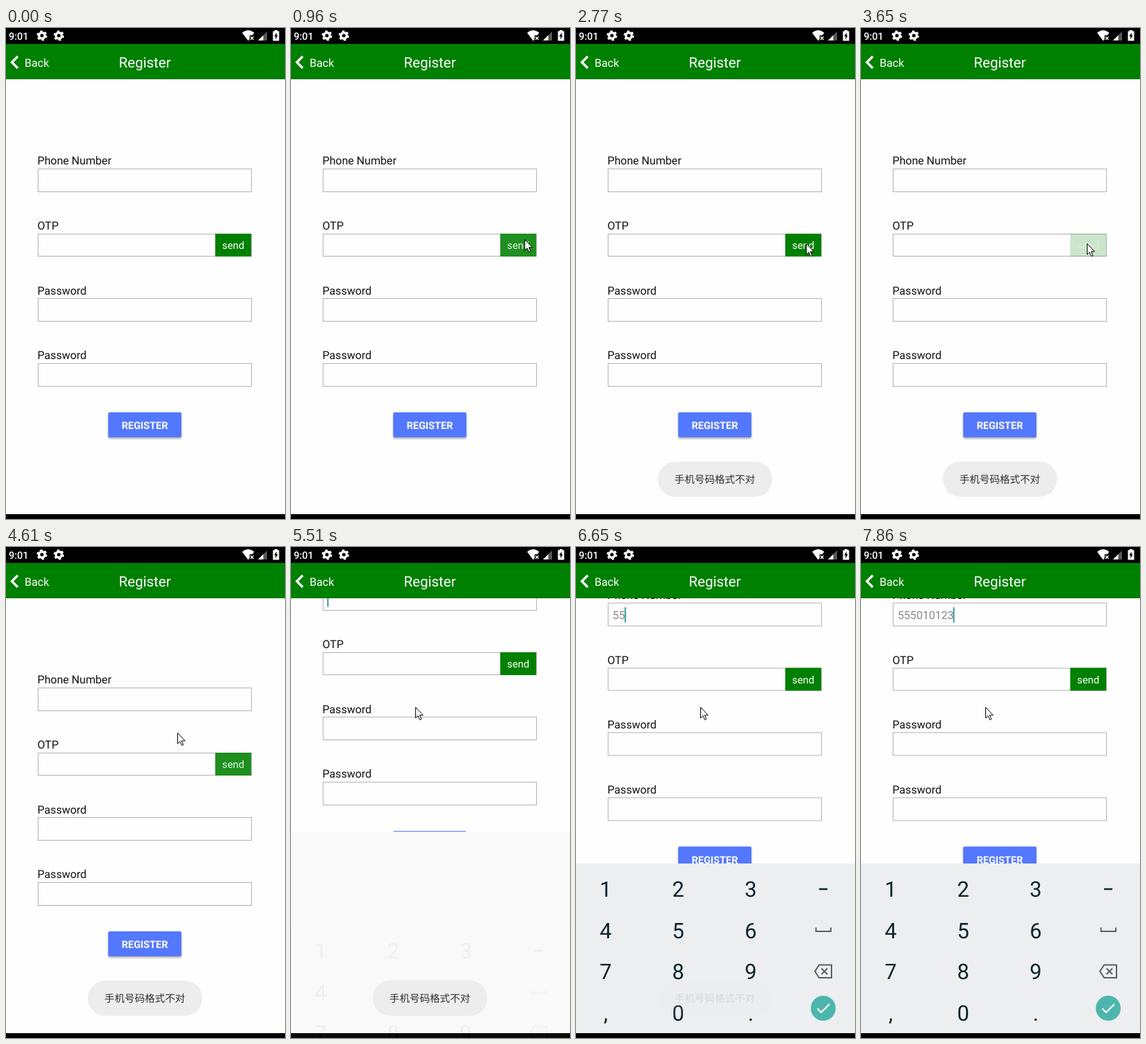
An HTML page that plays this animation: 404x709 px, repeating every 8 s.

```html
<!DOCTYPE html>
<html lang="en">
<head>
<meta charset="utf-8">
<title>Register form</title>
<style>
html, body { margin: 0; width: 100%; height: 100%; overflow: hidden; background: #fefefe; }
svg { display: block; width: 404px; height: 709px; font: 16.1px Roboto, sans-serif; text-rendering: geometricPrecision; }
.mid { text-anchor: middle; }
.box { fill: #fefefe; stroke: #b2b2b2; }
.line { fill: none; stroke: #526166; stroke-width: 2; }
#send > * { opacity: var(--alpha); }
#submit { filter: drop-shadow(0 2px 1.5px #0005); }
#keys { font-size: 31px; fill: #0a242c; }
#toast { font: 14.6px "Noto Sans CJK SC", "Noto Sans CJK", sans-serif; }
</style>
</head>
<body>
<svg viewBox="0 0 404 709">
  <defs>
    <g id="gear" fill="none" stroke="#fff">
      <circle r="4.2" stroke-width="3.4"/>
      <circle r="6.3" stroke-width="2.6" stroke-dasharray="3.3 3.3"/>
    </g>
  </defs>
  <rect width="404" height="709" fill="#fefefe"/>

  <g id="form">
    <g id="fields"></g>
    <text id="number" x="53" y="226" fill="#888"></text>
    <rect id="caret" y="209.5" width="1.8" height="22" fill="#209584"/>
    <g id="send">
      <rect x="303" y="297" width="52" height="33" fill="#008000"/>
      <text class="mid" x="329" y="319" font-size="14.8" fill="#fff">send</text>
    </g>
    <rect id="submit" x="148" y="555" width="106" height="36" rx="2" fill="#5478fd"/>
    <text class="mid" x="201" y="579" font-size="14.6" font-weight="700" fill="#fff">REGISTER</text>
  </g>

  <rect id="blank" width="404" height="320" fill="#fafafa"/>
  <rect y="23" width="404" height="51" fill="#008000"/>
  <rect y="73" width="404" height="1" fill="#006c00"/>
  <path d="M17 41l-8.5 8.5 8.5 8.5" fill="none" stroke="#fff" stroke-width="3.3"/>
  <text x="27" y="55.5" fill="#fff">Back</text>
  <text class="mid" x="201" y="57" font-size="20.6" fill="#fff">Register</text>

  <rect width="404" height="23" fill="#000"/>
  <rect y="702" width="404" height="7" fill="#000"/>
  <text x="4" y="17" font-size="14.5" font-weight="500" fill="#fff">9:01</text>
  <use href="#gear" x="52" y="11"/>
  <use href="#gear" x="76.5" y="11"/>
  <g fill="#fff">
    <path d="M342 7q8.7-7.5 17.4 0l-2.7 3.5h-4v5.5l-2 2.5z"/>
    <path d="M354 12.5l4.5 4.5m0-4.5l-4.5 4.5" stroke="#fff" stroke-width="1.4"/>
    <path d="M365 18h13v-13z" opacity=".35"/>
    <path d="M365 18h7.5v-7.5z"/>
    <path d="M389 3h4v1.5h2.5v14h-9v-14h2.5z"/>
  </g>
  <path d="M391.7 6.5v4h2l-3.4 6v-4.5h-2z"/>

  <g id="keyboard">
    <rect y="457" width="404" height="245" fill="#eceef0"/>
    <rect y="702" width="404" height="7" fill="#000"/>
    <g id="keys" class="mid"></g>
    <path d="M352 494h12" stroke="#0a242c" stroke-width="2.5"/>
    <path class="line" d="M347.5 549.5v5.500h21.500v-5.500"/>
    <path class="line" d="M352 603.5h18v18.500h-18l-6-9.250zM355.500 608.500l8.500 8.500m0-8.500l-8.500 8.500"/>
    <circle cx="358" cy="666" r="18" fill="#4db6ac"/>
    <path d="M349.5 666.500l5.500 5.500 12-12" fill="none" stroke="#fff" stroke-width="2.2"/>
  </g>

  <g id="toast">
    <rect x="118.5" y="626" width="165.5" height="51" rx="25" fill="#ededed"/>
    <text class="mid" x="201" y="657" fill="#262626">手机号码格式不对</text>
  </g>
  <path id="cursor" d="M.5 .5v15.5l3.500-3.300 2.600 5.900 2.300-1-2.600-5.700h5z" fill="#fff" stroke="#000"/>
</svg>
<script>
const LOOP = 8000, NUMBER = "555010123", PITCH = 93.7;

const moves = [ // start, end, dx, dy
  [360, 660, -55, -63], [2330, 2520, 12, 4], [2520, 2850, -23, 2], [4170, 4990, -147, -80]];
const presses = [ // down, up, depth
  [940, 1130, .8], [3050, 3210, .8], [3420, 3930, .8], [3930, 4620, .12]];
const toasts = [[1200, 3040], [3400, 6490]]; // show, hide

const $ = id => document.getElementById(id);
const set = (id, attrs) => {
  for (const name in attrs) $(id).setAttribute(name, attrs[name]);
};
const ramp = (t, from, to) => Math.min(1, Math.max(0, (t - from) / (to - from)));
const pulse = (t, on, off, fade) => ramp(t, on, on + fade) * (1 - ramp(t, off, off + fade));

$("fields").innerHTML = ["Phone Number", "OTP", "Password", "Password"].map((label, i) => {
  const edge = y => Math.floor(y + i * PITCH) + .5;
  const top = edge(203.3);
  return `<text x="45.5" y="${197.3 + i * PITCH}" fill="#111">${label}</text>
    <rect class="box" x="46.5" y="${top}" width="309" height="${edge(236.1) - top}"/>`;
}).join("");

$("keys").innerHTML = [..."123456789,0."].map((key, i) =>
  `<text x="${43 + i % 3 * 105}" y="${505 + Math.floor(i / 3) * 59.5}">${key}</text>`).join("");

function draw(t) {
  const open = t >= 5510, settled = t >= 5890;
  const count = Math.max(0, Math.floor((t - 6330) / 190) + 1);
  const slide = ramp(t, 5500, 5740);

  set("form", { transform: `translate(0 ${settled ? -122.5 : open ? -145 : 0})` });
  set("blank", { y: settled ? 457 : open ? 411 : 709 });
  set("keyboard", { opacity: slide, transform: `translate(0 ${93 * (1 - slide)})` });
  set("caret", { x: 52.5 + count * 9, opacity: +open });
  $("number").textContent = NUMBER.slice(0, count);

  const pressed = Math.max(...presses.map(([down, up, depth]) => depth * pulse(t, down, up, 130)));
  $("send").style.setProperty("--alpha", 1 - pressed);
  set("toast", { opacity: .96 * Math.max(...toasts.map(([show, hide]) => pulse(t, show, hide, 180))) });

  // The pointer passes the bottom edge briefly, then comes in from the right.
  const passing = t >= 60 && t < 130;
  let [x, y] = passing ? [357, 691] : [393, 368];
  for (const [from, to, dx, dy] of moves) {
    const k = ramp(t, from, to);
    x += dx * k;
    y += dy * k;
  }
  set("cursor", {
    transform: `translate(${Math.round(x)} ${Math.round(y)})`,
    opacity: +(passing || t >= 360)
  });
}

let start;
function frame(now) {
  start ??= now;
  draw((now - start) % LOOP);
  requestAnimationFrame(frame);
}
draw(0);
requestAnimationFrame(frame);
</script>
</body>
</html>
```
